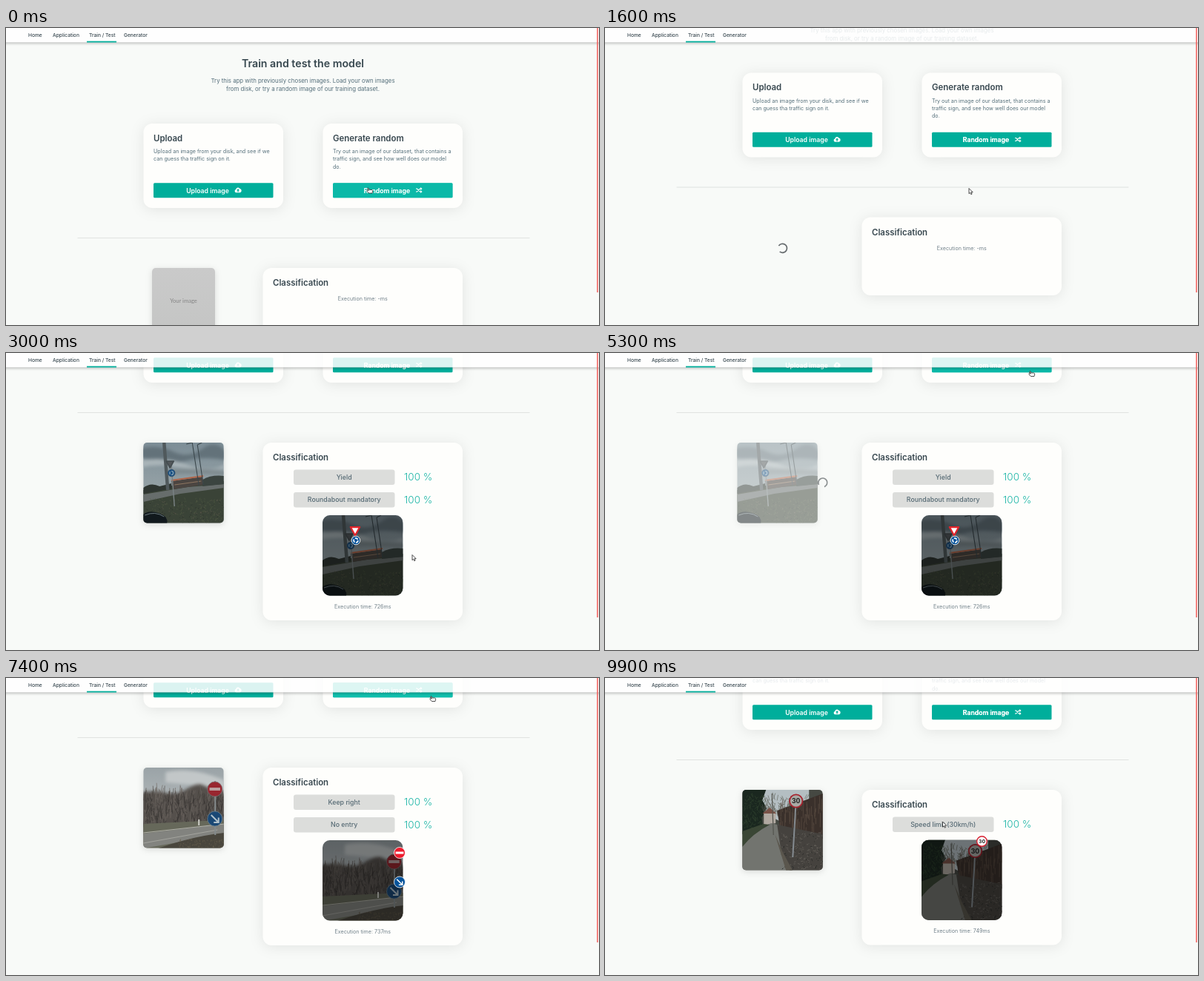
Write an HTML page that moves like this. It is 800 px wide and 401 px high and loops after 10 s.

```html
<!DOCTYPE html>
<html lang="en">
<head>
<meta charset="utf-8">
<title>Train and test the model</title>
<style>
html, body { margin: 0; width: 100%; height: 100%; overflow: hidden; background: #f8faf8; }
svg { display: block; font-family: Montserrat, Inter, sans-serif; }
.card { fill: #fefefc; filter: drop-shadow(0 2px 9px rgba(0,0,0,.09)); }
.pic { filter: drop-shadow(0 2px 4px rgba(0,0,0,.13)); }
.soft { filter: blur(2px); }
</style>
</head>
<body>
<svg id="stage" width="800" height="401" viewBox="0 0 800 401"></svg>
<script>
const GREEN = '#00ae9b', INK = '#37474f', SOFT = '#546e7a';
const PIC = 108.5, MID = 239.5, FADE = 550, LOOP = 10000;
const CLICKS = [450, 5025, 7425], ANSWERS = [1650, 6000, 8850];

const text = (x, y, size, str, fill = SOFT, weight = 400, anchor = 'start') =>
  `<text x="${x}" y="${y}" font-size="${size}" fill="${fill}" font-weight="${weight}" text-anchor="${anchor}">${str}</text>`;
const rect = (x, y, w, h, fill, r = 0, more = '') =>
  `<rect x="${x}" y="${y}" width="${w}" height="${h}" fill="${fill}" rx="${r}" ${more}/>`;
const shape = (d, fill) => `<path d="${d}" fill="${fill}"/>`;
const line = (d, stroke, width = 1) =>
  `<path d="${d}" fill="none" stroke="${stroke}" stroke-width="${width}"/>`;
const disc = (x, y, r, fill, stroke = 'none', width = 1) =>
  `<circle cx="${x}" cy="${y}" r="${r}" fill="${fill}" stroke="${stroke}" stroke-width="${width}"/>`;
const soft = content => `<g class="soft">${content}</g>`;

let seed = 7;
const random = () => (seed = seed * 16807 % 2147483647) / 2147483647;

// Thin random strokes for branches, grass and stones
function strokes(n, x, y, w, h, dx, dy, color, width = .6) {
  let d = '';
  for (let i = 0; i < n; i++) {
    d += `M${(x + random() * w).toFixed(1)} ${(y + random() * h).toFixed(1)}` +
         `l${((random() - .5) * dx).toFixed(1)} ${(-random() * dy).toFixed(1)}`;
  }
  return line(d, color, width);
}

const yieldSign = (x, y, s, fill, edge) =>
  `<path d="M${x - s} ${y - s * .8}h${2 * s}L${x} ${y + s}z" fill="${fill}" stroke="${edge}" stroke-width="${s * .35}" stroke-linejoin="round"/>`;
const roundabout = (x, y, r, blue, mark, edge) => disc(x, y, r, blue, edge, .8) +
  `<circle cx="${x}" cy="${y}" r="${r * .5}" fill="none" stroke="${mark}" stroke-width="${r * .28}" stroke-dasharray="${r * .75} ${r * .297}"/>`;
const noEntry = (x, y, r, red, bar, edge) =>
  disc(x, y, r, red, edge, .8) + rect(x - r * .72, y - r * .2, r * 1.44, r * .4, bar);
const keepRight = (x, y, r, blue, mark, edge) => disc(x, y, r, blue, edge, .8) +
  line(`M${x - r * .5} ${y - r * .5}L${x + r * .4} ${y + r * .4}M${x + r * .5} ${y - r * .15}v${r * .65}h${-r * .65}`, mark, r * .2);
const speed = (x, y, r, fill, red) => disc(x, y, r, fill, red, r * .2) +
  text(x, y + r * .36, r, '30', '#222', 700, 'middle');

const scenes = [
  rect(0, 0, PIC, PIC, 'url(#sky1)') +
  soft(shape('M-5 8Q20 2 40 12T80 8T114 16V24Q80 18 60 24T-5 20z', '#63727a') +
    shape('M-5 24Q30 18 60 30T114 28V35Q70 38 45 33T-5 34z', '#a9b4b8') +
    shape('M38 37Q70 33 114 40V44Q70 40 38 43z', '#7d898d')) +
  shape('M0 64L25 59 109 52V109H0z', '#3a4337') +
  shape('M0 70L60 60 109 56V61L50 69 0 80z', '#676d6c') +
  shape('M0 61Q10 53 22 59L38 55V62L0 69z', '#2f3632') +
  shape('M80 50Q92 43 109 45V56L80 59z', '#3b4440') +
  shape('M38 52L80 46V57L40 63z', '#4b4541') +
  line('M38 51L81 45', '#b0664a', 2) + line('M42 57L78 52', '#8c7560', 1.2) +
  strokes(170, 5, 76, 104, 34, 4, 3, '#4f5a42') +
  strokes(70, 20, 78, 85, 28, 4, 2, '#5f5a4c') +
  strokes(60, 0, 80, 109, 29, 4, 2, '#2a3029', .8) +
  line('M66 0L75 58M66 0L58 2M73 3L81 57M73 3L79 0', '#3a464b', 1.1) +
  line('M28 0L33 64', '#50595c', 4.5) + line('M37.5 26L42 86', '#7a8385', 1.4) +
  yieldSign(36, 29, 5, '#53585b', '#454d50') +
  roundabout(38, 41, 4.8, '#174e82', '#82a2b5', '#38536a') +
  shape('M0 97Q8 90 23 96Q34 100 32 109H0z', '#11191d') + line('M2 98Q16 92 28 100', '#6b797d', 1),

  rect(0, 0, PIC, PIC, 'url(#sky2)') +
  soft(shape('M30 6Q60 0 90 10T114 22V30Q80 24 30 20z', '#c2c7c8') +
    shape('M-5 34Q15 30 30 34T60 28T85 26L114 36V90H-5z', '#55504c')) +
  strokes(200, 0, 34, 109, 45, 8, 16, '#6b645e') +
  strokes(200, 0, 44, 109, 40, 7, 16, '#34322f') +
  strokes(50, 0, 36, 109, 10, 6, 14, '#4b4641') +
  shape('M0 76Q50 73 109 71V109H0z', '#66685a') +
  shape('M0 89L109 76V90L0 109z', '#82837f') +
  line('M0 88L109 76', '#c3c3bb', .8) + line('M0 102L100 84', '#b4b4ac', .7) +
  shape('M20 109Q65 93 109 88V109z', '#49463d') +
  strokes(90, 45, 98, 64, 11, 3, 3, '#69614e') +
  line('M75 70V78', '#d7d8d2', 1.8) + line('M97 18V91', '#858b8d', 2) +
  noEntry(96.5, 29, 10, '#98262f', '#b99f9f', '#7d6d70') +
  keepRight(96.5, 69, 10, '#1a4875', '#b0c0ca', '#687f90'),

  rect(0, 0, PIC, PIC, '#454842') +
  shape('M24 0H90V32L50 42 26 30z', '#b4bec2') +
  shape('M0 0H32L27 14 33 25 26 38 29 55 0 60z', '#1a271f') +
  strokes(110, 0, 8, 30, 45, 8, 6, '#32432f') +
  strokes(130, 30, 12, 58, 25, 9, 10, '#5c5f55') +
  shape('M29 31L37 26 45 32V45L29 48z', '#b1a9a1') + shape('M27 32L37 24 46 32z', '#795247') +
  shape('M0 68Q22 51 39 45L51 48 67 109H0z', '#72746f') +
  shape('M0 56L28 46 37 47Q14 59 0 77z', '#3a4635') +
  shape('M47 28L109 5V66L51 53z', '#3a302b') +
  strokes(65, 50, 25, 59, 38, 1, 22, '#594b41', .8) +
  shape('M47 47L109 60V109H64L52 81z', '#45423e') +
  strokes(110, 52, 58, 57, 50, 7, 2, '#66625c', .8) +
  strokes(60, 52, 60, 57, 48, 4, 2, '#292b28', 1) +
  shape('M44 60L55 85 68 109H59z', '#5a564d') +
  line('M40 5L42 61', '#53544e', 1.2) + line('M72 23L68 91', '#848b90', 2) +
  speed(72.5, 15, 8.7, '#a9a9a5', '#a8222e')
];

const results = [
  { labels: [], ms: '-', icons: '' },
  { labels: ['Yield', 'Roundabout mandatory'], ms: '726',
    icons: yieldSign(44, 21, 6.2, '#fff', '#e3242b') + roundabout(45, 34, 5.8, '#07539a', '#fff', '#fff') },
  { labels: ['Keep right', 'No entry'], ms: '737',
    icons: noEntry(104, 17, 7.5, '#ed1c2e', '#fff', '#fff') + keepRight(104, 56.5, 7.5, '#07539a', '#fff', '#fff') },
  { labels: ['Speed limit (30km/h)'], ms: '749', icons: speed(81.5, 2, 6.8, '#fff', '#d81f30') }
];

function resultCard({ labels, ms, icons }, n) {
  const rows = labels.length, height = rows ? 179 + rows * 30.5 : 105.5;
  let out = `<rect class="card" x="346.5" y="324" width="269.5" height="${height}" rx="12"/>` +
    text(360, 348, 11.4, 'Classification', INK, 600);
  labels.forEach((label, i) => {
    const y = 360.5 + i * 30.5;
    out += rect(388, y, 136.5, 20.5, '#dcdddb', 3) + text(456.2, y + 13.4, 8.8, label, '#566a74', 500, 'middle') +
      text(537, y + 14.6, 13.5, '100 %', '#1bb5a6', 300);
  });
  if (rows) {
    out += `<g transform="translate(427 ${height + 182})"><g clip-path="url(#round10)"><use href="#scene${n}"/>` +
      rect(0, 0, PIC, PIC, '#000', 0, 'opacity=".4"') + `</g>${icons}</g>`;
  }
  const y = rows ? 324 + height - 16.5 : 368;
  return `<g id="result${n}">${out}${text(481.3, y, 7.15, `Execution time: ${ms}ms`, '#71808a', 400, 'middle')}</g>`;
}

const box = (x, title, lines, label) =>
  `<rect class="card" x="${x}" y="129" width="188.5" height="114" rx="12"/>` +
  text(x + 13.5, 152.7, 11.4, title, INK, 600) +
  lines.map((s, i) => text(x + 13.5, 169 + i * 10.3, 7.15, s)).join('') +
  rect(x + 13.5, 209.3, 161.5, 20, GREEN, 1.5) +
  text(x + 86.5, 222.8, 8.7, label, '#fff', 600, 'middle');

const gradient = (id, ...colors) => `<linearGradient id="${id}" x2="0" y2="1">` +
  colors.map((c, i) => `<stop offset="${i / (colors.length - 1)}" stop-color="${c}"/>`).join('') + '</linearGradient>';
const clip = r => `<clipPath id="round${r}">${rect(0, 0, PIC, PIC, '#000', r)}</clipPath>`;

stage.innerHTML =
  `<defs>${gradient('sky1', '#7c8d96', '#929fa4', '#9aa5a8')}${gradient('sky2', '#9aa3a7', '#b4b9ba', '#9a9c9a')}
  ${gradient('blank', '#cacaca', '#c4c5c4')}${clip(5)}${clip(10)}
  ${scenes.map((s, i) => `<g id="scene${i + 1}">${s}</g>`).join('')}
  <g id="scene0">${rect(0, 0, 85, 88, 'url(#blank)', 5)}
    <text x="42.5" y="47" font-size="7.6" fill="#858585" text-anchor="middle" font-family="Lato, sans-serif">Your image</text></g></defs>` +
  rect(0, 0, 800, 401, '#f8faf8') +
  `<g id="page">` +
  text(400.5, 52.5, 14.2, 'Train and test the model', INK, 600, 'middle') +
  text(400.5, 74.3, 7.83, 'Try this app with previously chosen images. Load your own images', SOFT, 400, 'middle') +
  text(400.5, 85.3, 7.83, 'from disk, or try a random image of our training dataset.', SOFT, 400, 'middle') +
  box(185.5, 'Upload', ['Upload an image from your disk, and see if we', 'can guess tha traffic sign on it.'], 'Upload image') +
  shape('M310.5 222.2a2.2 2.2 0 0 1-.3-4.3a2.9 2.9 0 0 1 5.4-.9a2.7 2.7 0 0 1 .2 5.2zM312.3 221.2h1.5v-2h1.3l-2-2.2-2.1 2.2h1.3z', '#fff') +
  box(427.5, 'Generate random', ['Try out an image of our dataset, that contains a', 'traffic sign, and see how well does our model', 'do.'], 'Random image') +
  rect(441, 209.3, 161.5, 20, '#14c4b2', 1.5, 'id="hover"') +
  text(514, 222.8, 8.7, 'Random image', '#fff', 600, 'middle') +
  line('M553 217h1.7l3.6 4h1.6M553 221h1.7l3.6-4h1.6', '#fff', 1.2) +
  shape('M559.2 215l2.4 2-2.4 2zM559.2 219l2.4 2-2.4 2z', '#fff') +
  rect(96.5, 283, 610, 1, '#e0e3e1') +
  `<g id="photo" class="pic"><g id="photoClip"><use id="photoUse"/></g></g>
  <circle id="spinner" r="6" fill="none" stroke="#666b6e" stroke-width="1.7" stroke-dasharray="28.3 9.4"/>` +
  results.map(resultCard).join('') + `</g>` +
  rect(-10, 0, 820, 19.5, '#fff', 0, 'opacity=".86"') +
  [.2, .13, .08, .04].map((o, i) => rect(0, 19.3 + i, 800, 1, '#000', 0, `opacity="${o}"`)).join('') +
  text(30, 11.7, 6.65, 'Home', INK, 500) + text(63, 11.7, 6.65, 'Application', INK, 500) +
  text(112, 11.7, 6.65, 'Train / Test', INK, 500) + text(159, 11.7, 6.65, 'Generator', INK, 500) +
  rect(109, 17.7, 40, 1.8, GREEN) +
  rect(797.2, 0, 1.5, 357, '#f35b58') +
  `<g id="pointer" fill="#fff" stroke="#222" stroke-width=".8" stroke-linejoin="round">
    <path id="arrow" d="M0 0V7.2L1.7 5.7 2.8 8.2 4.1 7.6 3 5.2H5.2z"/>
    <path id="hand" d="M-1.2.4Q-.6-.5.2.4L1 2.3 4.6 2.5Q6 2.8 5.6 5L5 7H.5L-1.8 4.6Q-2-0 .3 3.8z"/></g>`;

// time, x, y of the pointer tip
const moves = [[0, 489, 216], [200, 491, 216.5], [2300, 440, 193], [2400, 370, 295], [2500, 548, 272.5],
  [3300, 556, 190], [3400, 560, 115], [3500, 562, 75], [3700, 567, 48], [3800, 571.5, 29.5],
  [4000, 573, 27], [4100, 574, 24.5], [9800, 591, 110], [9900, 455.5, 194]];

const clamp = v => Math.max(0, Math.min(1, v));
const ramp = (t, a, b) => clamp((t - a) / (b - a));
const smooth = u => u * u * (3 - 2 * u);
const count = (times, t) => times.filter(s => t >= s).length;
const show = (el, on) => el.style.display = on ? '' : 'none';
const byId = id => document.getElementById(id);

function draw(t) {
  const scroll = t >= ANSWERS[2] ? 173
    : 68.5 * smooth(ramp(t, 100, 600)) + 134.5 * smooth(ramp(t, 2700, 3000));
  page.setAttribute('transform', `translate(0 ${-scroll})`);

  const clicks = count(CLICKS, t), answers = count(ANSWERS, t), loading = clicks > answers;
  results.forEach((_, i) => show(byId('result' + i), i === answers));

  // The photo and the spinner share one centred row while they cross-fade
  const since = loading ? CLICKS[clicks - 1] : answers ? ANSWERS[answers - 1] : -FADE;
  const u = clamp((t - since) / FADE);
  const photoAlpha = loading ? 1 - u : u;
  const width = answers ? PIC : 85, both = u < 1;
  const left = MID - (width + (both ? 14 : 0)) / 2;
  show(photo, photoAlpha > 0);
  photo.setAttribute('opacity', photoAlpha);
  photo.setAttribute('transform', `translate(${left} 324)`);
  photoClip.setAttribute('clip-path', answers ? 'url(#round5)' : 'none');
  photoUse.setAttribute('href', '#scene' + answers);

  const start = CLICKS[Math.max(0, clicks - 1)], turn = (t - start) / 750 * 360 + 20;
  const sx = both ? left + width + 7 : MID, sy = both ? 378 : 365.8;
  show(spinner, loading || both);
  spinner.setAttribute('opacity', clamp(1.5 * (1 - photoAlpha)));
  spinner.setAttribute('transform', `translate(${sx} ${sy}) rotate(${turn})`);

  const hovered = t < 200 ? 1 : t < ANSWERS[2] ? ramp(t, 4500, 4800) : 0;
  const pressed = t === 5000 || t === 7400;
  hover.setAttribute('opacity', pressed ? .8 : .55 * hovered);

  const [, x, y] = moves[count(moves.map(m => m[0]), t) - 1];
  const isHand = t < 200 || t >= 4100 && t < ANSWERS[2];
  pointer.setAttribute('transform', `translate(${x} ${y})`);
  show(hand, isHand);
  show(arrow, !isHand);
}

const begin = performance.now();
function tick() {
  const t = (performance.now() - begin) % LOOP;
  draw(Math.floor(t / 100) * 100);
  requestAnimationFrame(tick);
}
tick();
</script>
</body>
</html>
```
